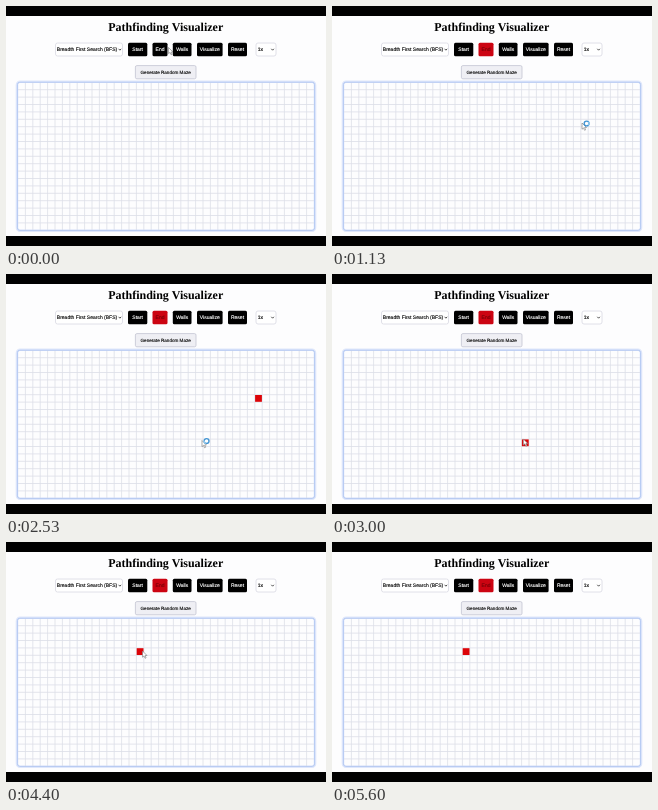
These frames come from a looping animation (320 by 240 pixels, 5670 ms). An HTML page:

```html
<!DOCTYPE html>
<html lang="en">
<head>
<meta charset="utf-8">
<title>Pathfinding Visualizer</title>
<style>
  html, body { margin: 0; width: 100%; height: 100%; overflow: hidden; background: #000; }
  svg { display: block; width: 100vw; height: 100vh; }
  text { text-anchor: middle; text-rendering: geometricPrecision; }
  .title { font: bold 12px "Liberation Serif", serif; }
  .label { font: 5px "Liberation Sans", Arial, sans-serif; stroke-width: .15; }
  .dark { fill: #fff; stroke: #fff; }
  .light { fill: #111; stroke: #111; }
  .select { fill: #fff; stroke: #d9d9e2; stroke-width: .8; }
  .chevron { fill: none; stroke: #222; stroke-width: .8; }
  #endButton.active rect { fill: #cc0412; }
  #endButton.active text { fill: #7c0008; stroke: #7c0008; }
</style>
</head>
<body>
<svg viewBox="0 0 320 240">
  <defs>
    <clipPath id="page"><rect y="10" width="320" height="220"/></clipPath>
  </defs>
  <rect width="320" height="240" fill="#000"/>
  <rect y="10" width="320" height="220" fill="#fdfdfe"/>
  <text class="title" x="159.7" y="24.8">Pathfinding Visualizer</text>

  <rect class="select" x="49.5" y="37" width="67" height="13" rx="2"/>
  <text class="label light" x="81" y="45.3">Breadth First Search (BFS)</text>
  <path class="chevron" d="M112.6 42.8l1.3 1.4 1.3-1.4"/>
  <rect class="select" x="250" y="37" width="20" height="13" rx="2"/>
  <text class="label light" x="254.3" y="45.3">1x</text>
  <path class="chevron" d="M265.3 42.8l1.3 1.4 1.3-1.4"/>
  <g id="buttons"></g>

  <rect x="129.4" y="59.6" width="60.6" height="13.2" rx="1.5" fill="#efeff4" stroke="#c3c4d2" stroke-width=".8"/>
  <text class="label light" x="159.7" y="67.9" style="font-size:4.6px">Generate Random Maze</text>

  <rect x="11" y="75.8" width="298" height="149" rx="3" fill="none" stroke="#dfe7fb" stroke-width="2.6"/>
  <path id="grid" fill="none" stroke="#dcdfe7" stroke-width=".8"/>
  <rect x="11.4" y="76.2" width="297.2" height="148.2" rx="2.5" fill="none" stroke="#b4c9f2" stroke-width="1"/>
  <rect id="goal" width="6.8" height="6.8" fill="#dc0408"/>

  <g clip-path="url(#page)">
    <g id="cursor">
      <path d="M0 0V6.2L1.5 4.9 2.6 7.3 3.6 6.8 2.6 4.5H4.5Z" fill="#fff" stroke="#777" stroke-width=".6"/>
      <g id="busy" fill="none" stroke-width="1.4">
        <circle cx="4.6" cy=".5" r="2.4" fill="#fff" stroke="#4294d2"/>
        <path id="spark" d="M4.6 -1.9A2.4 2.4 0 0 1 7 .5" stroke="#8fc8ee"/>
      </g>
    </g>
  </g>
</svg>
<script>
const LOOP = 5670, FPS = 15;
const CELL = 7.4, COLS = 40, ROWS = 20, LEFT = 12, TOP = 76.3;
const $ = id => document.getElementById(id);

// id, label, x, width
const buttons = [
  ["startButton", "Start", 122, 19.3],
  ["endButton", "End", 146.5, 15],
  ["wallsButton", "Walls", 166.8, 18.7],
  ["runButton", "Visualize", 191, 25.6],
  ["resetButton", "Reset", 222, 19]
];
$("buttons").innerHTML = buttons.map(([id, label, x, w]) =>
  `<g id="${id}"><rect x="${x}" y="36.8" width="${w}" height="13.4" rx="1.5"/>
   <text class="label dark" x="${x + w / 2}" y="45.3">${label}</text></g>`).join("");

let lines = "";
for (let c = 1; c < COLS; c++) lines += `M${LEFT + c * CELL} ${TOP}v${ROWS * CELL}`;
for (let r = 1; r < ROWS; r++) lines += `M${LEFT} ${TOP + r * CELL}h${COLS * CELL}`;
$("grid").setAttribute("d", lines);

// time, x, y of the pointer tip
const path = [
  [0, 162.5, 41.5], [130, 162, 41.5], [330, 155, 43], [470, 155, 43],
  [1130, 250, 117], [1270, 252, 123], [1470, 252, 123],
  [1730, 238.5, 125.5], [2530, 196, 166.5], [2670, 194, 167.5], [2930, 194, 167.5],
  [3470, 135.5, 112], [3800, 136.5, 109], [4600, 136.5, 109], [5330, 150, 0]
];
// time, column, row of the end cell
const goals = [[1460, 32, 6], [2860, 24, 12], [3860, 16, 4]];
const PRESS = 395, BUSY_END = 2800;

function pointerAt(t) {
  const i = path.findIndex(k => k[0] > t);
  if (i < 0) return path[path.length - 1].slice(1);
  const [t0, x0, y0] = path[i - 1], [t1, x1, y1] = path[i];
  const u = (t - t0) / (t1 - t0), e = u * u * (3 - 2 * u);
  return [x0 + (x1 - x0) * e, y0 + (y1 - y0) * e];
}

function draw(time) {
  const t = Math.floor((time + 4) * FPS / 1000) * 1000 / FPS;
  $("endButton").classList.toggle("active", t >= PRESS);

  const goal = goals.filter(g => g[0] <= t).pop();
  $("goal").style.display = goal ? "" : "none";
  if (goal) {
    $("goal").setAttribute("x", LEFT + goal[1] * CELL + .3);
    $("goal").setAttribute("y", TOP + goal[2] * CELL + .3);
  }

  $("cursor").setAttribute("transform", `translate(${pointerAt(t)})`);
  $("busy").style.display = t >= PRESS && t < BUSY_END ? "" : "none";
  $("spark").setAttribute("transform", `rotate(${t * .36} 4.6 .5)`);
}

const begin = performance.now();
function tick() {
  draw((performance.now() - begin) % LOOP);
  requestAnimationFrame(tick);
}
tick();
</script>
</body>
</html>
```
